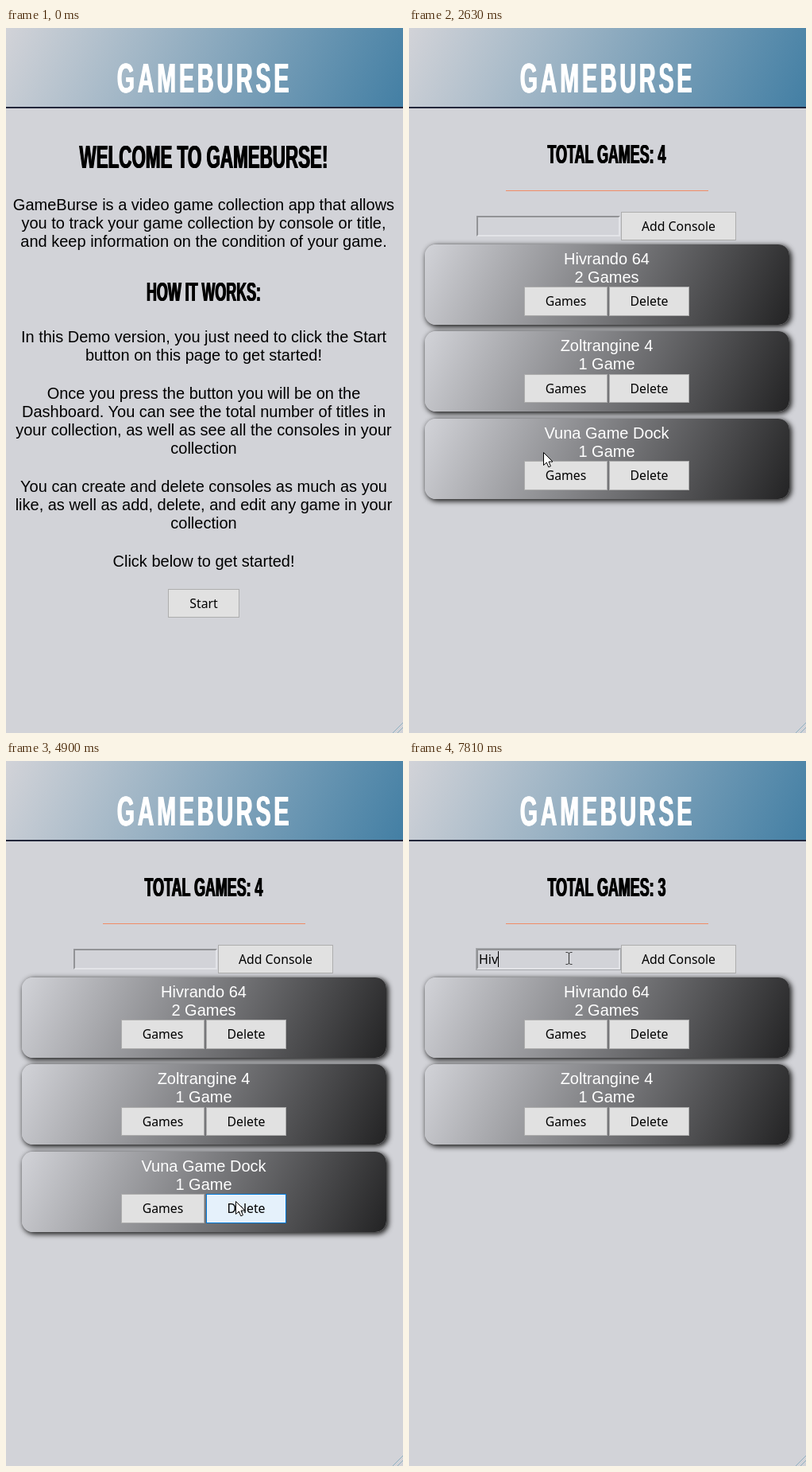
Animation of 500x886 px, one loop 7.99 s. Source, as an HTML page:

```html
<!DOCTYPE html>
<html lang="en">
<head>
<meta charset="utf-8">
<title>GameBurse</title>
<style>
  html, body { margin: 0; width: 100%; height: 100%; overflow: hidden; }
  body { position: relative; background: #d2d3d8; font: 20px/23px "Liberation Sans", Arial, sans-serif; color: #000; }
  [hidden] { display: none !important; }
  header { position: absolute; inset: 0 0 auto; height: 99px; border-bottom: 2px solid #22263a;
    background: linear-gradient(115deg, #d2d3d8, #437fa4); }
  h1, h2, h3, p { position: absolute; margin: 0; text-align: center; white-space: nowrap; }
  p { left: 0; width: 498px; }
  h1, h2, h3 { left: 249px; font-weight: bold; line-height: 50px; transform: translateX(-50%) scaleX(.55);
    text-shadow: 1px 0, -1px 0; }
  h1 { left: 250px; top: 38px; font-size: 52px; letter-spacing: 7px; color: #fff; }
  h2 { font-size: 40.7px; }
  h3 { font-size: 32.5px; }
  .rule { position: absolute; left: 122px; top: 204px; width: 255px; height: 1px; background: #f08c66; }
  .button { position: absolute; box-sizing: border-box; height: 36px; border: 1px solid #adadad; background: #e1e1e1;
    font: 15.8px/34px "Noto Sans", "Open Sans", sans-serif; text-align: center; white-space: nowrap; color: #000; }
  .hover { background: #e5f1fb; border-color: #0078d7; }
  .pressed { background: #cce4f7; border-color: #005499; box-shadow: 0 8px 16px rgba(0,0,0,.2), 0 6px 20px rgba(0,0,0,.19); }
  #start { left: 204px; top: 705px; width: 90px; }
  #add { left: 267px; top: 231px; width: 145px; }
  .card { position: absolute; left: 20px; width: 459px; height: 101px; border-radius: 14px; color: #fff;
    background: linear-gradient(115deg, #d2d3d8, #232324); box-shadow: 2px 2px 6px 1px #222; }
  .card p { top: 7px; width: 458px; }
  .card .button { top: 53.2px; height: 36.6px; line-height: 35px; }
  .games { left: 125px; width: 105px; }
  .delete { left: 232px; width: 101px; }
  #field { position: absolute; left: 85px; top: 236px; width: 177px; height: 22px; border: 2px solid;
    border-color: #929396 #e3e4e8 #e3e4e8 #929396; font: 16px/20px "Noto Sans", "Open Sans", sans-serif; }
  #field.focus { outline: 1px solid #a5a7ab; }
  #typed { position: absolute; left: 1px; top: 1px; height: 20px; border-right: 1px solid transparent; }
  #typed.caret { border-color: #000; }
  #click { position: absolute; left: -15px; top: -15px; width: 30px; height: 30px; border-radius: 50%; background: rgba(236,242,30,.65); }
  #pointer { position: absolute; left: 0; top: 0; }
  #pointer svg { position: absolute; left: 0; top: 0; overflow: visible; }
  #grip { position: absolute; right: 0; bottom: 0; }
</style>
</head>
<body>
<header><h1>GAMEBURSE</h1></header>

<main id="welcome">
  <h2 style="top:137px">WELCOME TO GAMEBURSE!</h2>
  <p style="top:211px">GameBurse is a video game collection app that allows<br>you to track your game collection by console or title,<br>and keep information on the condition of your game.</p>
  <h3 style="top:307px">HOW IT WORKS:</h3>
  <p style="top:377px">In this Demo version, you just need to click the Start<br>button on this page to get started!</p>
  <p style="top:448px">Once you press the button you will be on the<br>Dashboard. You can see the total number of titles in<br>your collection, as well as see all the consoles in your<br>collection</p>
  <p style="top:565px">You can create and delete consoles as much as you<br>like, as well as add, delete, and edit any game in your<br>collection</p>
  <p style="top:659px">Click below to get started!</p>
  <div class="button" id="start">Start</div>
</main>

<main id="dashboard" hidden>
  <h3 style="top:134px">TOTAL GAMES: <span id="total">4</span></h3>
  <div class="rule"></div>
  <div id="field"><span id="typed"></span></div>
  <div class="button" id="add">Add Console</div>
</main>

<svg id="grip" width="13" height="13" fill="none" stroke="#8fb0c0"><path d="M0 13 13 0M6 13 13 6"/></svg>

<div id="pointer">
  <div id="click"></div>
  <svg id="arrow" width="13" height="20"><path d="M.5.5V16.5L4.3 13 6.8 18.8 9.4 17.7 7 12H12Z" fill="#fff" stroke="#000"/></svg>
  <svg id="beam" width="9" height="17" fill="none" stroke="#333"><path d="M-3.5-7.5H-1.5L.5-6.5 2.5-7.5H4.5M.5-6.5V6.5M-3.5 7.5H-1.5L.5 6.5 2.5 7.5H4.5"/></svg>
</div>

<script>
const LOOP = 7990;
const $ = id => document.getElementById(id);
const between = (t, from, to) => t >= from && t < to;

const cards = [["Hivrando 64", "2 Games"], ["Zoltrangine 4", "1 Game"], ["Vuna Game Dock", "1 Game"]].map(([name, count], i) => {
  const card = document.createElement("div");
  card.className = "card";
  card.style.top = 272 + i * 109.4 + "px";
  card.innerHTML = `<p>${name}<br>${count}</p><div class="button games">Games</div><div class="button delete">Delete</div>`;
  $("dashboard").append(card);
  return card;
});
const buttons = [...document.querySelectorAll(".button")];
const lastDelete = cards[2].querySelector(".delete");

// Pointer path: time, x, y
const path = [
  [160, 415, 852], [530, 199, 674], [820, 275, 724], [2300, 275, 724],
  [2630, 169, 533], [2850, 208, 480], [3120, 212, 334], [3250, 212, 317],
  [3500, 212, 356], [3930, 238, 490], [4520, 289, 553], [5260, 289, 553],
  [5540, 236, 440], [5820, 195, 245], [6100, 195, 245], [6280, 201, 248]
];

// Zero at pauses and turning points
function slope(i, axis) {
  const a = path[i - 1], b = path[i], c = path[i + 1];
  if (!a || !c || (b[axis] - a[axis]) * (c[axis] - b[axis]) <= 0) return 0;
  return (c[axis] - a[axis]) / (c[0] - a[0]);
}

// Cubic Hermite interpolation
function pointerAt(t) {
  const next = path.findIndex(stop => stop[0] > t);
  if (next < 0) return path[path.length - 1].slice(1);
  if (next === 0) return path[0].slice(1);
  const a = path[next - 1], b = path[next], span = b[0] - a[0], u = (t - a[0]) / span;
  return [1, 2].map(k => {
    const blend = u * u * (3 - 2 * u);
    return a[k] + (b[k] - a[k]) * blend +
      span * (slope(next - 1, k) * u * (1 - u) ** 2 - slope(next, k) * u * u * (1 - u));
  });
}

function contains(element, x, y) {
  const r = element.getBoundingClientRect();
  return x >= r.left && x < r.right && y >= r.top && y < r.bottom;
}

function render(t) {
  $("welcome").hidden = t >= 1420;
  $("dashboard").hidden = t < 1420;
  cards[2].hidden = t >= 4980;
  $("total").textContent = t < 4980 ? 4 : 3;

  const [x, y] = pointerAt(t);
  const visible = t >= 160;
  $("pointer").hidden = !visible;
  $("pointer").style.transform = `translate(${Math.round(x)}px, ${Math.round(y)}px)`;
  const overField = contains($("field"), x, y);
  $("beam").style.display = overField ? "" : "none";
  $("arrow").style.display = overField ? "none" : "";

  const startPressed = between(t, 1320, 1420), deletePressed = between(t, 4750, 4900);
  $("click").hidden = !(startPressed || deletePressed || between(t, 6050, 6230));
  for (const button of buttons) button.classList.toggle("hover", visible && contains(button, x, y));
  $("start").classList.toggle("pressed", startPressed);
  lastDelete.classList.toggle("pressed", deletePressed);

  $("field").classList.toggle("focus", t >= 6050);
  $("typed").textContent = "Hiv".slice(0, [7380, 7630, 7810].filter(key => t >= key).length);
  $("typed").classList.toggle("caret", between(t, 6050, 6560) || t >= 7120);
}

function tick() {
  render(performance.now() % LOOP);
  requestAnimationFrame(tick);
}
tick();
</script>
</body>
</html>
```
